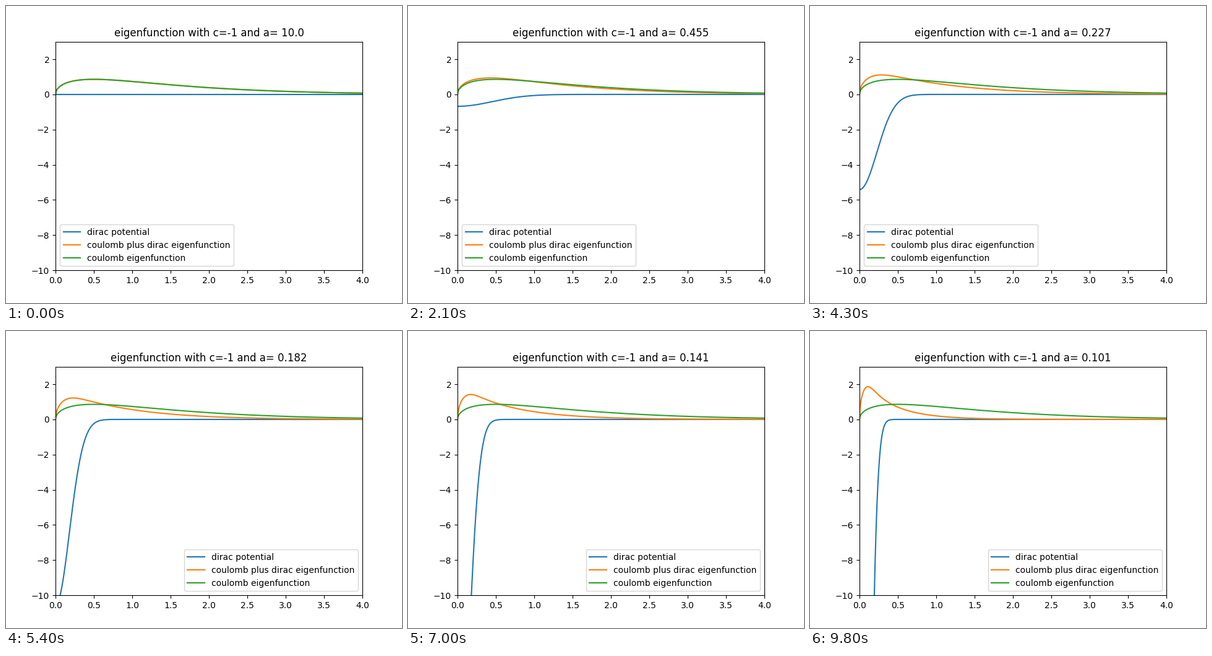
These frames come from a looping animation (640x480 px, 9900 ms). A matplotlib script:

```python
import matplotlib.pyplot as plt
import numpy as np
from matplotlib.animation import FuncAnimation

STEPS = 99
POINTS = 400
MODES = 160
C = -1

# Logarithmic radial mesh
x = np.linspace(-6, 2.5, POINTS)
h = x[1] - x[0]
r = np.exp(x)
plot_r = np.r_[0, r]


def width(step):
    return 10 / (step + 1)


def smeared_delta(radius, a):
    return C * np.exp(-radius**2 / (2 * a**2)) / ((2 * np.pi) ** 1.5 * a**3)


def coulomb_modes():
    """Lowest s-states of -1/r, for y = sqrt(r) R scaled by r."""
    diag = 1 / h**2 + 1 / 8 - r
    diag[0] -= np.exp(-h / 2) / (2 * h**2)  # y ~ sqrt(r) at the origin
    off = np.full(POINTS - 1, -0.5 / h**2)
    matrix = np.diag(diag) + np.diag(off, 1) + np.diag(off, -1)
    energies, vectors = np.linalg.eigh(matrix / np.outer(r, r))
    return energies[:MODES], vectors[:, :MODES]


energies, modes = coulomb_modes()


def ground_state(a):
    coupling = modes.T @ (smeared_delta(r, a)[:, None] * modes)
    vectors = np.linalg.eigh(np.diag(energies) + coupling)[1]
    y = modes @ vectors[:, 0] / r
    y *= np.sign(y.sum()) / np.sqrt(np.sum(y**2 * r) * h)
    return np.r_[0, y]


fig, ax = plt.subplots(figsize=(6.4, 4.8), dpi=100)
ax.set_xlim(0, 4)
ax.set_ylim(-10, 3)
potential, = ax.plot([], [], label="dirac potential")
combined, = ax.plot([], [], label="coulomb plus dirac eigenfunction")
ax.plot(plot_r, 2 * np.sqrt(plot_r) * np.exp(-plot_r),
        label="coulomb eigenfunction")
ax.legend(loc="best")
title = ax.set_title("")


def update(step):
    a = width(step)
    potential.set_data(plot_r, smeared_delta(plot_r, a))
    combined.set_data(plot_r, ground_state(a))
    title.set_text(f"eigenfunction with c={C} and a= {round(a, 3)}")
    return potential, combined, title


anim = FuncAnimation(fig, update, frames=STEPS, interval=100,
                     repeat=True, repeat_delay=0, blit=False)
plt.show()
```
